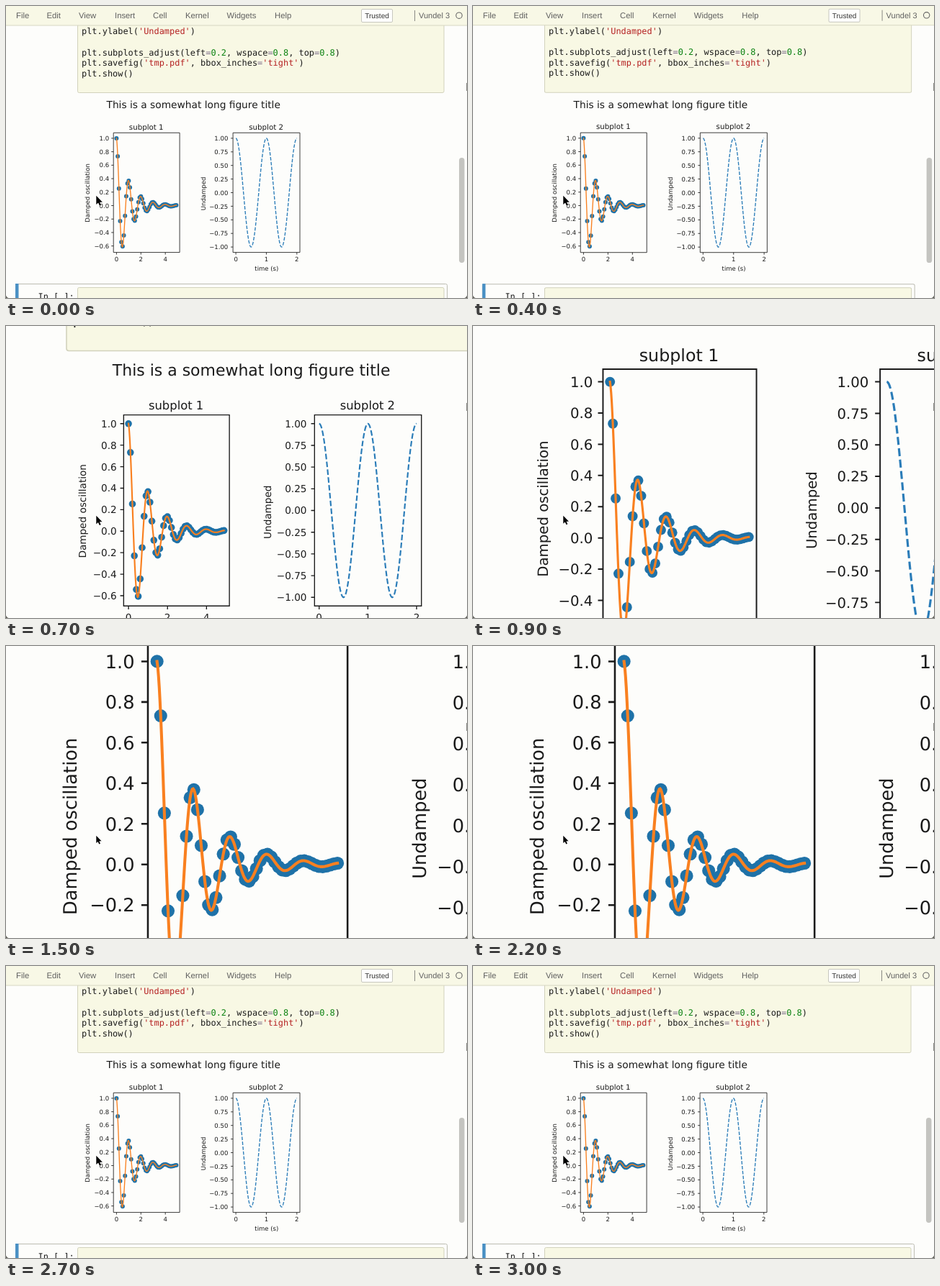
An HTML page that plays this animation: 640x406 px, repeating every 3100 ms.

```html
<!DOCTYPE html>
<html lang="en">
<head>
<meta charset="utf-8">
<title>Notebook zoom</title>
<style>
  html, body { margin: 0; width: 100%; height: 100%; overflow: hidden; background: #fdfdfb; }
  svg { display: block; width: 100vw; height: 100vh; }
  text { white-space: pre; text-rendering: geometricPrecision; fill: #1a1a1a; }
  .plot { font-family: "DejaVu Sans", sans-serif; font-size: 8.5px; }
  .code { font-family: "DejaVu Sans Mono", monospace; font-size: 11.93px; }
  .menu { font-family: "Liberation Sans", Arial, sans-serif; font-size: 11.3px; }
  .menu text { fill: #606060; }
  .str { fill: #b52222; }
  .num { fill: #0a8010; }
  .op { fill: #7a6a88; }
</style>
</head>
<body>
<svg viewBox="0 0 640 406" preserveAspectRatio="none">
  <filter id="soft" filterUnits="userSpaceOnUse" x="0" y="0" width="640" height="406" color-interpolation-filters="sRGB">
    <feGaussianBlur id="blur" stdDeviation="0"/>
  </filter>
  <rect width="640" height="406" fill="#fdfdfb"/>
  <g id="page">
    <g id="cells"></g>
    <g id="plots" class="plot"></g>
    <g id="menu" class="menu"></g>
  </g>
  <path d="M0 402.5Q.6 405 3.5 406H0ZM640 402.5Q639.4 405 636.5 406H640Z" fill="#55554c"/>
  <rect x="639" y="107" width="1" height="11" fill="#8a8a84"/>
  <path id="pointer" d="M0 0v12l2.7-2.5 1.9 4.2 2-.9-1.9-4h3.7z" fill="#000" stroke="#fff" stroke-width=".8" paint-order="stroke"/>
</svg>
<script>
const NS = "http://www.w3.org/2000/svg";
const $ = id => document.getElementById(id);

function add(parent, tag, attrs, text) {
  const el = document.createElementNS(NS, tag);
  for (const k in attrs) el.setAttribute(k, attrs[k]);
  if (text !== undefined) el.textContent = text;
  parent.appendChild(el);
  return el;
}
const label = (parent, x, y, text, more) => add(parent, "text", { x, y, ...more }, text);
const box = (parent, x, y, width, height, more) => add(parent, "rect", { x, y, width, height, ...more });

// Code cells
const CELL = { fill: "#f8f8e4", stroke: "#d2d2bc", "stroke-width": 1, rx: 2 };

function codeLine(y, parts) {
  const line = add($("cells"), "text", { x: 105, y, class: "code" });
  for (const [text, kind] of parts) add(line, "tspan", kind ? { class: kind } : {}, text);
}

function drawCells() {
  const g = $("cells");
  box(g, 99.5, -20, 508.5, 140.5, CELL);
  codeLine(39, [["plt.ylabel("], ["'Undamped'", "str"], [")"]]);
  codeLine(68.5, [["plt.subplots_adjust(left"], ["=", "op"], ["0.2", "num"], [", wspace"], ["=", "op"],
    ["0.8", "num"], [", top"], ["=", "op"], ["0.8", "num"], [")"]]);
  codeLine(83, [["plt.savefig("], ["'tmp.pdf'", "str"], [", bbox_inches"], ["=", "op"], ["'tight'", "str"], [")"]]);
  codeLine(97.6, [["plt.show()"]]);

  box(g, 13.5, 386.5, 599, 60, { fill: "none", stroke: "#bcbcb2", rx: 2 });
  box(g, 13, 386, 4.5, 60, { fill: "#4a90c4" });
  box(g, 99.5, 391.5, 508.5, 60, CELL);
  label(g, 44.5, 407.6, "In [ ]:", { class: "code" });

  box(g, 629, 211, 7.5, 146, { rx: 3.7, fill: "#c4c4c0" });
}

// Menu bar
function drawMenu() {
  const g = $("menu");
  box(g, 0, 0, 640, 27, { fill: "#f8f8e6" });
  box(g, 0, 26.5, 640, 1, { fill: "#d8d8c4" });
  const items = { File: 14, Edit: 56.5, View: 101, Insert: 151, Cell: 204, Kernel: 249, Widgets: 306.5, Help: 373 };
  for (const name in items) label(g, items[name], 17, name);
  box(g, 493.5, 4.5, 43, 18, { fill: "#fefefd", stroke: "#c8c8c0", rx: 1.5 });
  label(g, 515, 17, "Trusted", { "text-anchor": "middle", style: "font-size:10px;fill:#333" });
  box(g, 567, 6, 1, 15, { fill: "#8a8a84" });
  label(g, 573, 17, "Vundel 3", { style: "font-size:11px" });
  add(g, "circle", { cx: 629, cy: 13.2, r: 4.2, fill: "none", stroke: "#666", "stroke-width": 1.1 });
}

// Plots
const INK = "#1a1a1a", TOP = 176.3, BOTTOM = 342.6;

function axes(o) {
  const g = $("plots");
  const px = x => o.x0 + x * o.ux, py = y => o.y0 - y * o.uy;
  const mid = (o.left + o.right) / 2;
  let d = "";
  for (const x of o.xTicks) {
    d += `M${px(x)} ${BOTTOM}v3`;
    label(g, px(x), 355.3, x, { "text-anchor": "middle" });
  }
  for (let i = o.yFrom; i <= o.yTo; i++) {
    const v = i * o.yStep;
    d += `M${o.left} ${py(v)}h-3`;
    label(g, o.left - o.gap, py(v) + 3.1, v.toFixed(o.digits).replace("-", "\u2212"), { "text-anchor": "end" });
  }
  d += `M${o.left} ${TOP}H${o.right}V${BOTTOM}H${o.left}Z`;
  o.draw(g, px, py);
  add(g, "path", { d, fill: "none", stroke: INK, "stroke-width": .85 });
  label(g, mid - .4, 171.6, o.title, { "text-anchor": "middle", style: "font-size:10.25px" });
  add(g, "text", { transform: `translate(${o.labelX} ${o.labelY}) rotate(-90)`, "text-anchor": "middle" }, o.yLabel);
}

function curve(g, f, end, px, py, more) {
  const pts = [];
  for (let i = 0, n = 240; i <= n; i++) {
    const x = end * i / n;
    pts.push(px(x).toFixed(2) + "," + py(f(x)).toFixed(2));
  }
  add(g, "polyline", { points: pts.join(" "), fill: "none", "stroke-width": 1.35, ...more });
}

const wave = x => Math.cos(2 * Math.PI * x);
const damped = x => wave(x) * Math.exp(-x);

function drawPlots() {
  label($("plots"), 260.2, 142.3, "This is a somewhat long figure title",
    { "text-anchor": "middle", style: "font-size:13.75px" });
  axes({
    left: 149.2, right: 241.1, x0: 153.4, ux: 16.95, y0: 277.5, uy: 93.6, gap: 6.1,
    xTicks: [0, 2, 4], yFrom: -3, yTo: 5, yStep: .2, digits: 1,
    title: "subplot 1", yLabel: "Damped oscillation", labelX: 116.3, labelY: 260,
    draw(g, px, py) {
      for (let i = 0; i < 50; i++)
        add(g, "circle", { cx: px(i / 10), cy: py(damped(i / 10)), r: 3, fill: "#1f72a8" });
      curve(g, damped, 4.9, px, py, { stroke: "#f98020", "stroke-linecap": "square" });
    }
  });
  axes({
    left: 315.1, right: 408, x0: 319.1, ux: 42.35, y0: 259.5, uy: 75.6, gap: 6.8,
    xTicks: [0, 1, 2], yFrom: -4, yTo: 4, yStep: .25, digits: 2,
    title: "subplot 2", yLabel: "Undamped", labelX: 277.2, labelY: 260.9,
    draw(g, px, py) {
      curve(g, wave, 2, px, py, { stroke: "#2a7cb8", "stroke-dasharray": "4.77 2.06" });
    }
  });
  label($("plots"), 361.8, 368, "time (s)", { "text-anchor": "middle" });
}

// Zoom about the pointer tip; the enlarged page softens
const LOOP = 3100, STEP = 100, CX = 125.5, CY = 264.5, GAIN = 2.016, SOFT = .26;

function ease(t, start, length) {
  const u = Math.min(1, Math.max(0, (t - start) / length));
  return (1 - Math.cos(Math.PI * u)) / 2;
}

function render(ms) {
  const t = Math.floor((ms % LOOP) / STEP) * STEP;
  const zoom = GAIN * (ease(t, 386, 857) - ease(t, 2208, 460));
  const page = $("page");
  page.setAttribute("transform", `translate(${CX} ${CY}) scale(${1 + zoom}) translate(${-CX} ${-CY})`);
  if (zoom > 0) page.setAttribute("filter", "url(#soft)");
  else page.removeAttribute("filter");
  $("blur").setAttribute("stdDeviation", SOFT * Math.min(1, zoom));
  $("pointer").setAttribute("transform", `translate(125.3 263.8) scale(${1.02 - .08 * zoom})`);
}

drawCells();
drawPlots();
drawMenu();

const begin = performance.now();
function tick() {
  render(performance.now() - begin);
  requestAnimationFrame(tick);
}
tick();
</script>
</body>
</html>
```
